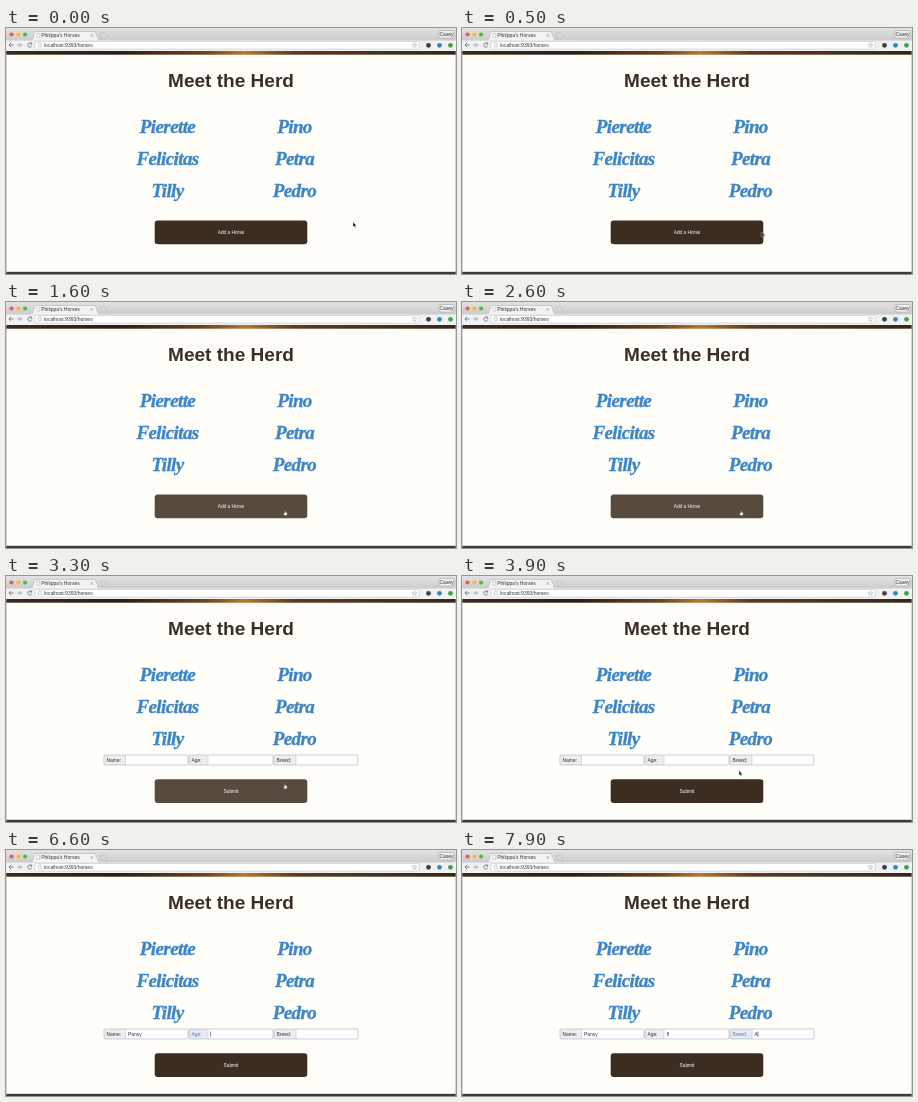
Animation, 450 px wide and 246 px high, one loop 8000 ms. Source, as an HTML page:

```html
<!DOCTYPE html>
<html lang="en">
<head>
<meta charset="utf-8">
<title>Meet the Herd</title>
<style>
html, body { margin: 0; width: 100%; height: 100%; overflow: hidden; background: #fffef9; }
svg { display: block; width: 100vw; height: 100vh; }
text { font-family: "Liberation Sans", Arial, sans-serif; font-size: 5px; fill: #333; }
.title { font-size: 19.05px; font-weight: bold; fill: #3b2e24; text-anchor: middle; }
.herd text {
  font: italic bold 19px "Liberation Serif", "Times New Roman", serif;
  letter-spacing: -.6px; text-anchor: middle;
  fill: #3d85c6; stroke: #3d85c6; stroke-width: .35px;
}
.button text { font-size: 4.75px; fill: #fff; text-anchor: middle; }
.button rect { fill: #3b2d21; }

.button, .button rect, .before, .after, .arrow, .hand, .beam {
  animation: 8s step-end infinite;
}
.button { animation-name: drop; }
.button rect { animation-name: hover; }
.before { animation-name: before; }
.after { animation-name: after; }
.arrow { animation-name: arrow; }
.hand { animation-name: hand; }
.beam { animation-name: beam; }
.pointer { animation: travel 8s infinite ease-in-out; }

@keyframes drop { 0% { transform: none; } 33.75%, 100% { transform: translateY(10.7px); } }
@keyframes hover { 0% { fill: #3b2d21; } 7.5% { fill: #574a3e; } 43.75%, 100% { fill: #3b2d21; } }
@keyframes before { 0% { visibility: visible; } 33.75%, 100% { visibility: hidden; } }
@keyframes after { 0% { visibility: hidden; } 33.75%, 100% { visibility: visible; } }
@keyframes arrow {
  0% { visibility: visible; } 7.5% { visibility: hidden; }
  43.75% { visibility: visible; } 53.75%, 100% { visibility: hidden; }
}
@keyframes hand { 0% { visibility: hidden; } 7.5% { visibility: visible; } 43.75%, 100% { visibility: hidden; } }
@keyframes beam { 0% { visibility: hidden; } 53.75% { visibility: visible; } 66.25%, 100% { visibility: hidden; } }
@keyframes travel {
  0%, 1% { transform: translate(347px, 194px); }
  9.5%, 40% { transform: translate(279px, 208px); }
  48%, 50.5% { transform: translate(277px, 194.5px); }
  56%, 100% { transform: translate(150px, 184px); }
}
</style>
</head>
<body>
<svg viewBox="0 0 450 246" preserveAspectRatio="none">
  <defs>
    <linearGradient id="tabs" x2="0" y2="1">
      <stop stop-color="#e2e2e2"/><stop offset="1" stop-color="#cbcbcb"/>
    </linearGradient>
    <linearGradient id="banner">
      <stop stop-color="#3b2a1d"/><stop offset=".25" stop-color="#2b1d14"/>
      <stop offset=".44" stop-color="#6b4320"/><stop offset=".53" stop-color="#b8772d"/>
      <stop offset=".64" stop-color="#5a3b22"/><stop offset="1" stop-color="#35261b"/>
    </linearGradient>
  </defs>

  <rect width="450" height="246" fill="#fffef9"/>
  <rect width="450" height="13" fill="url(#tabs)"/>
  <circle cx="5.5" cy="6.5" r="2.1" fill="#f7564f"/>
  <circle cx="12.3" cy="6.5" r="2.1" fill="#f9b930"/>
  <circle cx="19.1" cy="6.5" r="2.1" fill="#36c64b"/>
  <path d="M26 12.5L29 3.5H89L93 12.5" fill="#f3f3f3" stroke="#aaa" stroke-width=".5"/>
  <path d="M31 5.3h2.6v4h-2.6z" fill="#fff" stroke="#999" stroke-width=".4"/>
  <text x="35.2" y="9.2">Philippa's Horses</text>
  <path d="M84.5 6.3l2.4 2.4m0-2.4l-2.4 2.4" stroke="#777" stroke-width=".6"/>
  <path d="M94 5h5l2 5h-5z" fill="#d9d9d9" stroke="#aaa" stroke-width=".4"/>
  <rect x="433" y="2.5" width="15" height="7.5" rx="1" fill="#eee" stroke="#999" stroke-width=".5"/>
  <text x="440.5" y="8" text-anchor="middle">Casey</text>

  <rect y="12.5" width="450" height="10.5" fill="#f1f1f1"/>
  <g fill="none" stroke="#666" stroke-width=".8">
    <path d="M7.5 17H3m2-2l-2 2l2 2"/>
    <path d="M11 17h4.5m-2-2l2 2l-2 2" stroke="#999"/>
    <path d="M25.5 15.6a2.1 2.1 0 1 0 .3 2.3m-.1-3.3v1.5h-1.6"/>
  </g>
  <rect x="29" y="13.5" width="384" height="7.6" rx="1" fill="#fff" stroke="#bbb" stroke-width=".5"/>
  <path d="M32.5 15h2.6v4h-2.6z" fill="#fff" stroke="#888" stroke-width=".4"/>
  <text x="38" y="19">localhost:9393/horses</text>
  <path d="M408.5 14.8l.7 1.6 1.7.1-1.3 1.1.4 1.7-1.5-.9-1.5.9.4-1.7-1.3-1.1 1.7-.1z" fill="none" stroke="#888" stroke-width=".4"/>
  <circle cx="422.5" cy="17.3" r="2.4" fill="#34404a"/>
  <circle cx="433.5" cy="17.3" r="2.4" fill="#3b86b5"/>
  <circle cx="444.5" cy="17.3" r="2.4" fill="#3fa447"/>
  <rect y="23" width="450" height="3.7" fill="url(#banner)"/>
  <rect y="243.8" width="450" height="2.2" fill="#3f3a36"/>
  <path d="M.3 23V246M449.7 23V246" stroke="#aaa" stroke-width=".6"/>

  <text class="title" x="225" y="59">Meet the Herd</text>
  <g class="herd">
    <text x="161.5" y="105">Pierette</text>
    <text x="288.5" y="105">Pino</text>
    <text x="161.5" y="137">Felicitas</text>
    <text x="288.5" y="137">Petra</text>
    <text x="161.5" y="169">Tilly</text>
    <text x="288.5" y="169">Pedro</text>
  </g>

  <g class="after" id="form"></g>

  <g class="button">
    <rect x="148.7" y="192.6" width="152.6" height="23.6" rx="3"/>
    <text class="before" x="225" y="206.2">Add a Horse</text>
    <text class="after" x="225" y="206.2">Submit</text>
  </g>

  <g class="pointer">
    <path class="arrow" d="M0 0V5L1.2 4 2 5.8 2.9 5.4 2.1 3.7H3.6Z" fill="#111" stroke="#fff" stroke-width=".4"/>
    <path class="hand" d="M-.5.3q.7-.7 1 0v1.8l1.8.6v1.5L1.7 5.4H-.7L-2 3.4l.4-.5 1.1.6z" fill="#fff" stroke="#222" stroke-width=".4"/>
    <path class="beam" d="M-1-2.8Q0-2.8 0-2 0-2.8 1-2.8M0-2V2M-1 2.8Q0 2.8 0 2 0 2.8 1 2.8" fill="none" stroke="#333" stroke-width=".5"/>
  </g>
</svg>
<script>
const LOOP = 8000, BLINK = 500;
const form = document.getElementById('form');

// keys: the time at which each character of the value is typed
const fields = [
  { label: 'Name:', x: 98, split: 119.5, end: 182, focus: 4600, blur: 6300,
    value: 'Pansy', keys: [5400, 5550, 5700, 5800, 5950] },
  { label: 'Age:', x: 183, split: 202, end: 267, focus: 6300, blur: 7500,
    value: '8', keys: [7100] },
  { label: 'Breed:', x: 268, split: 290, end: 352, focus: 7500, blur: LOOP,
    value: 'A', keys: [7800] }
];

function add(tag, attrs, content = '') {
  const node = document.createElementNS(form.namespaceURI, tag);
  for (const key in attrs) node.setAttribute(key, attrs[key]);
  node.textContent = content;
  return form.appendChild(node);
}

for (const f of fields) {
  const top = 179, height = 10;
  add('rect', { x: f.x, y: top, width: f.end - f.x, height, rx: 1.2, fill: '#fff' });
  f.tag = add('rect', { x: f.x, y: top, width: f.split - f.x, height, rx: 1.2 });
  add('path', { d: `M${f.split} ${top}v${height}`, stroke: '#b5b9c0', 'stroke-width': .5 });
  add('rect', { x: f.x, y: top, width: f.end - f.x, height, rx: 1.2,
    fill: 'none', stroke: '#a9aeb6', 'stroke-width': .6 });
  f.name = add('text', { x: f.x + 2.4, y: 185.9 }, f.label);
  f.text = add('text', { x: f.split + 2.4, y: 185.9 });
  f.caret = add('path', { stroke: '#222', 'stroke-width': .5 });
}

function draw(now) {
  const t = now % LOOP;
  for (const f of fields) {
    const active = t >= f.focus && t < f.blur;
    const typed = f.keys.filter(k => k <= t);
    const since = t - Math.max(f.focus, ...typed);
    f.text.textContent = f.value.slice(0, typed.length);
    f.name.style.fill = active ? '#4385c9' : '#333';
    f.tag.setAttribute('fill', active ? '#e6eaf2' : '#eee');
    const x = f.split + 2.6 + (typed.length ? f.text.getComputedTextLength() : 0);
    f.caret.setAttribute('d', `M${x} 181.4v5.4`);
    f.caret.style.opacity = active && since % (2 * BLINK) < BLINK ? 1 : 0;
  }
  requestAnimationFrame(draw);
}
requestAnimationFrame(draw);
</script>
</body>
</html>
```
